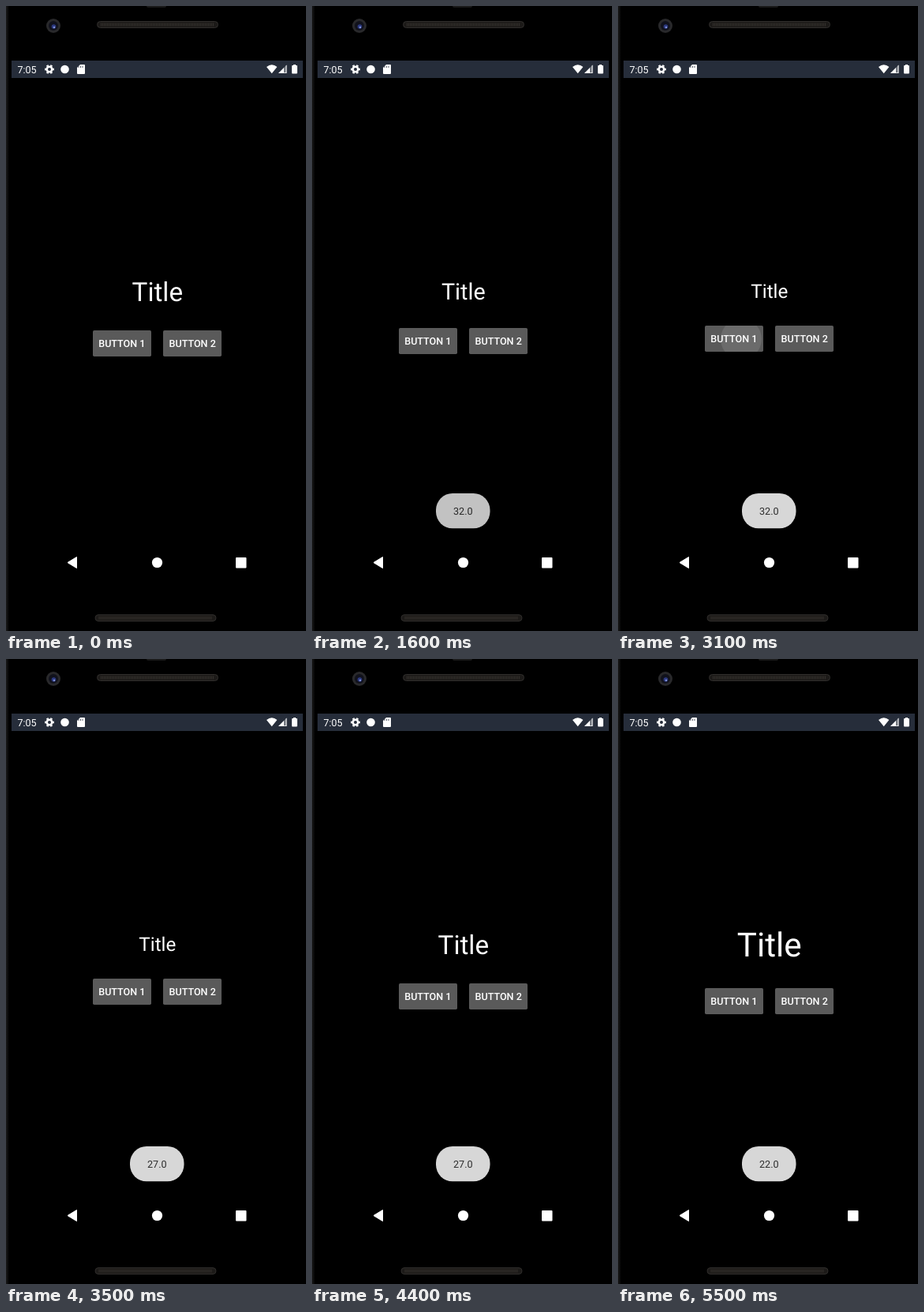
Write an HTML page that moves like this. It is 380x790 px and loops after 6.5 s.

```html
<!DOCTYPE html>
<html lang="en">
<head>
<meta charset="utf-8">
<title>Title size buttons</title>
<style>
  html, body { margin: 0; width: 100%; height: 100%; overflow: hidden; background: #000; }
  svg { display: block; }
  text { font: 12.57px Roboto, sans-serif; fill: #fff; text-anchor: middle; text-rendering: geometricPrecision; }
  .button text { font-weight: 500; }
  .button rect { fill: #5a5a5a; }
  .grille rect { fill: #1c1a18; stroke: #302e2c; }
  .grille path { stroke: #34312d; stroke-width: 4; stroke-dasharray: 1 1; }
</style>
</head>
<body>
<svg width="380" height="790" viewBox="0 0 380 790">
  <defs>
    <linearGradient id="edge">
      <stop stop-color="#1b1b1b"/><stop offset="1" stop-color="#000"/>
    </linearGradient>
    <g id="grille" class="grille">
      <rect x=".5" y=".5" width="153" height="8" rx="4"/>
      <path d="M5 4.5H149"/>
    </g>
  </defs>

  <!-- phone body -->
  <rect width="380" height="790"/>
  <rect width="4" height="790" fill="url(#edge)"/>
  <rect x="178" y="-2" width="25" height="4" rx="2" fill="#1a1a1a"/>
  <circle cx="60" cy="25" r="9" fill="#29292b"/>
  <circle cx="60" cy="25" r="6" fill="#11121c"/>
  <circle cx="60.5" cy="26" r="2.8" fill="#2d3a80"/>
  <circle cx="61" cy="27" r="1.2" fill="#8495d8"/>
  <use href="#grille" x="115" y="19"/>
  <use href="#grille" x="112.5" y="769"/>

  <!-- status bar -->
  <rect x="7" y="69" width="369" height="22" fill="#262d3a"/>
  <text x="26.5" y="84.7">7:05</text>
  <g fill="none" stroke="#fff">
    <circle cx="55" cy="80" r="3.3" stroke-width="2.6"/>
    <circle cx="55" cy="80" r="5" stroke-width="1.8" pathLength="12" stroke-dasharray="1 1" stroke-dashoffset=".5"/>
  </g>
  <g fill="#fff">
    <circle cx="74.5" cy="80" r="5.3"/>
    <path d="M94 74h5q1 0 1 1v10q0 1-1 1h-8q-1 0-1-1v-7z"/>
    <path d="M330 77q6.7-5.6 13.4 0l-6.7 8.3z"/>
    <path d="M345 85l10.5-10.500v10.500z" opacity=".35"/>
    <path d="M345 85l7-7v7zM354.500 75.500l1-1v10.500h-10.500l.8-.8h8.700z"/>
    <path d="M364 74h3v1h1q1 0 1 1v8.500q0 1-1 1h-5q-1 0-1-1v-8.500q0-1 1-1h1z"/>
    <!-- navigation bar -->
    <path d="M78 703.500L89.500 696.500V710.500z" stroke="#fff" stroke-linejoin="round"/>
    <circle cx="191.500" cy="703.500" r="6.600"/>
    <rect x="291" y="697" width="13.500" height="13.500" rx="1"/>
  </g>
  <path d="M92 75.500v2M94.500 75.500v2M97 75.500v2" transform="translate(0 .5)" stroke="#262d3a" stroke-width=".8"/>

  <text id="title" x="191.800">Title</text>
  <g id="buttons">
    <svg class="button" x="110" width="74" height="33">
      <rect width="74" height="33" rx="1.800"/>
      <circle cx="46" cy="17" fill="#fff"/>
      <text x="36.800" y="21.200">BUTTON 1</text>
    </svg>
    <svg class="button" x="199" width="74" height="33">
      <rect width="74" height="33" rx="1.800"/>
      <circle cx="40" cy="19" fill="#fff"/>
      <text x="37.200" y="21.200">BUTTON 2</text>
    </svg>
  </g>
  <g id="toast">
    <rect x="157" y="616" width="68.500" height="44.300" rx="21" fill="#d7d7d7"/>
    <text id="value" x="191.300" y="643.400" style="fill:#2b2b2b"></text>
  </g>
</svg>

<script>
const LOOP = 6500, STEP = 100, DP = 0.898, START_SIZE = 37;
const $ = id => document.getElementById(id);
const ripples = document.querySelectorAll('.button circle');

// Each tap: button index, ripple step times (the last one clears it), first radius and opacity.
const taps = [
  [1, [1200, 1300, 1400, 1500], 28, .14],
  [1, [1700, 1800, 1900, 2000], 28, .14],
  [1, [2400, 2500, 2600, 2700], 32.5, .19],
  [0, [3100, 3200, 3300, 3400], 26, .1],
  [0, [3600, 3700, 3900], 28, .14],
  [0, [4200, 4400], 32, .18],
  [0, [4700, 4800, 4900, 5000], 28, .14],
  [0, [5200, 5300, 5400, 5500], 28, .14],
];

function showRipple(circle, radius, opacity) {
  circle.setAttribute('r', radius);
  circle.setAttribute('opacity', opacity);
}

function draw(t) {
  let size = START_SIZE;
  ripples.forEach(circle => showRipple(circle, 0, 0));
  for (const [button, times, radius, opacity] of taps) {
    if (t < times[0]) break;
    size += button ? -5 : 5;
    const phase = times.filter(time => time <= t).length - 1;
    if (phase < times.length - 1) {
      showRipple(ripples[button], radius + phase * 24, [opacity, .16, .06][phase]);
    }
  }

  $('title').style.fontSize = size * DP + 'px';
  $('title').setAttribute('y', 359.5 + size * .352);
  $('buttons').setAttribute('transform', `translate(0 ${410 + (size - START_SIZE) / 5 * 3})`);

  $('toast').setAttribute('opacity', Math.min(1, Math.max(0, (t - 1300) * .3 / STEP)));
  $('value').textContent = t < 3500 ? '32.0' : t < 5100 ? '27.0' : '22.0';
}

function tick() {
  draw(Math.floor(performance.now() % LOOP / STEP) * STEP);
  requestAnimationFrame(tick);
}
tick();
</script>
</body>
</html>
```
